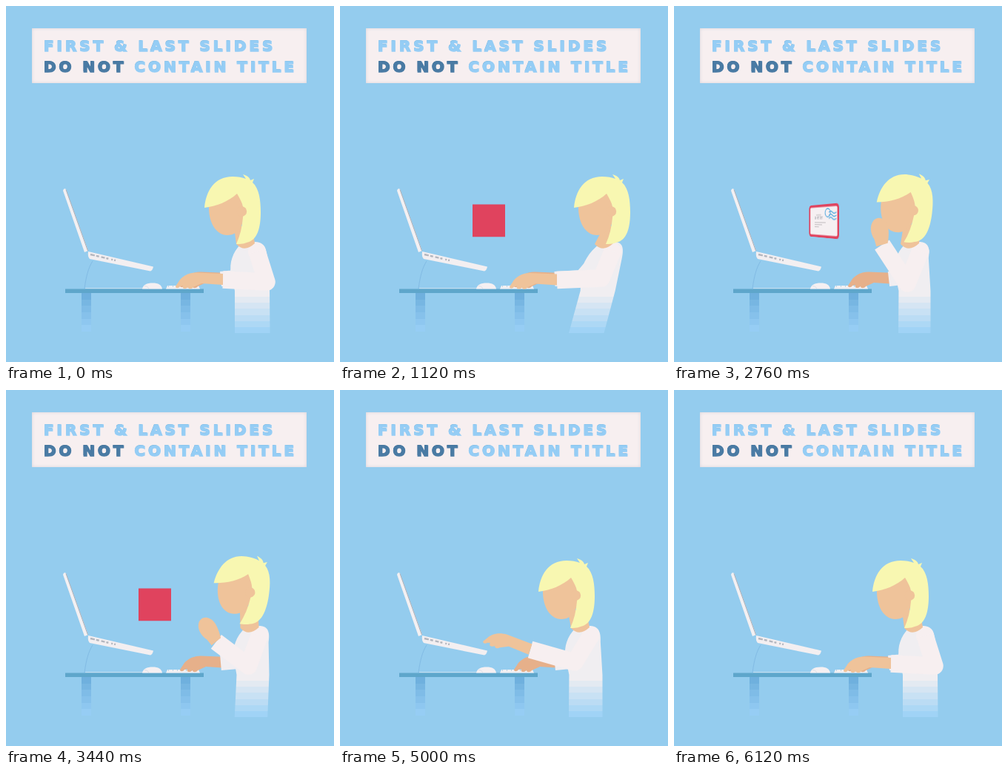
Write an HTML page that moves like this. It is 443 px wide and 480 px high and loops after 6160 ms.

```html
<!DOCTYPE html>
<html lang="en">
<head>
<meta charset="utf-8">
<title>Letter at the desk</title>
<style>
  html, body { margin: 0; width: 100%; height: 100%; overflow: hidden; background: #94ccee; }
  #stage { position: absolute; left: 0; top: 0; width: 443px; height: 480px; overflow: hidden; background: #94ccee; }
  #stage > * { position: absolute; }
  .panel { left: 35px; top: 30px; width: 371px; height: 74px; background: #f7eff0; box-shadow: inset 0 0 4px #d6d2da; }
  .title {
    left: 51px; top: 40px; margin: 0; white-space: nowrap;
    font: bold 20px/28px "DejaVu Sans", sans-serif; letter-spacing: 3.95px;
    color: #95cdf5; -webkit-text-stroke: 1.5px #95cdf5; text-shadow: -.6px -.6px 0 #70b0da;
  }
  .title b { color: #4a7ba4; -webkit-text-stroke-color: #4a7ba4; text-shadow: -.6px -.6px 0 #376890; }
  svg { left: 0; top: 0; }
  #letter { left: 0; top: 0; width: 0; height: 0; perspective: 310px; }
  #card { position: absolute; transform-style: preserve-3d; }
  #card > * { position: absolute; backface-visibility: hidden; }
  .front { left: -22px; top: -22px; width: 44px; height: 44px; background: #e0435e; }
  .back { left: -33px; top: -22px; transform: rotateY(180deg); }
</style>
</head>
<body>
<div id="stage">
  <div class="panel"></div>
  <h1 class="title">FIRST &amp; LAST SLIDES<br><b>DO NOT</b> CONTAIN TITLE</h1>

  <svg width="443" height="480" viewBox="0 0 443 480">
    <defs>
      <linearGradient id="shirt" gradientUnits="userSpaceOnUse" x1="0" y1="384" x2="0" y2="441"></linearGradient>
      <linearGradient id="leg" gradientUnits="userSpaceOnUse" x1="0" y1="387" x2="0" y2="439"></linearGradient>
    </defs>

    <!-- laptop -->
    <path d="M117 344C111 353 108 366 106 381" fill="none" stroke="#82bbe4"/>
    <path d="M107 380.5H186" stroke="#c5def0"/>
    <path d="M77 249Q78 245 81 247L111 330L106 332Z" fill="#f3f0f2"/>
    <path d="M81 247.5L110.5 330" stroke="#a9aeb7"/>
    <path d="M111 331L199 351.5Q198 356.500 195 357.500L113 341Q110 338 111 331Z" fill="#f3eff1"/>
    <path d="M114 335L150 343.5" stroke="#b4b7bf" stroke-width="2.4" stroke-dasharray="6 2 4 3 5 2 3 4 2 2 2 3"/>

    <!-- desk -->
    <path d="M102 387h13v52h-13zM236 387h13v52h-13z" fill="url(#leg)"/>
    <path d="M80 381.5H267V387H80z" fill="#5ea6cb"/>
    <path d="M184 381.5C185 376 190 373.500 198 373.500C206 373.500 210 376 211 381.5Z" fill="#f5f0f2"/>
    <path d="M193 381Q191 377 187 377.5" fill="none" stroke="#d6dce5" stroke-width=".8"/>
    <path d="M216 381.5L218 377H260L262 381.5Z" fill="#f2f0f3"/>
    <path d="M219 378H260" stroke="#b9d5e6" stroke-width="2" stroke-dasharray="1 5"/>

    <!-- woman -->
    <path id="farHand" transform="translate(299 368) scale(-1 1)" fill="#e6b08a"/>
    <polyline id="farSleeve" fill="none" stroke="#f1eef1" stroke-width="20" stroke-linejoin="round"/>
    <path id="torso" fill="url(#shirt)"/>
    <circle id="shoulder" r="12" cy="331" fill="#f7eff0"/>
    <polyline id="sleeve" fill="none" stroke="#f7eff0" stroke-width="23.500" stroke-linejoin="round"/>
    <path id="neck" fill="#efc39a"/>
    <g id="head">
      <path d="M274 268C273 291 283 309 299 309C313 309 322 296 322 276L314 248L290 250Z" fill="#efc39a"/>
      <path id="hair" fill="#f8f7b1"/>
      <circle cx="318.500" cy="277" r="6.700" fill="#efc39a"/>
    </g>
    <path id="hand" fill="#efc39a"/>
  </svg>

  <div id="letter">
    <div id="card">
      <div class="front"></div>
      <svg class="back" width="66" height="45" viewBox="0 0 66 45">
        <rect x="1.700" y="1.700" width="62.600" height="41.600" rx="3.500" fill="#f6f0f2" stroke="#e0435e" stroke-width="3.400"/>
        <text x="14" y="20" font-family="Inter, sans-serif" font-size="5.800" fill="#8b8f96">a letter</text>
        <path d="M18 14h11M14 24.500h25M14 27.500h17M14 30.500h10" stroke="#b9b5b7" stroke-width=".9"/>
        <g fill="none" stroke="#55aade" stroke-width="1.300">
          <circle cx="43.500" cy="11.500" r="5.500"/>
          <path d="M46 11q4-3 7 0t8 0M46 15q4-3 7 0t8 0M46 19q4-3 7 0t8 0"/>
        </g>
      </svg>
    </div>
  </div>
</div>

<script>
const LOOP = 6160;
const $ = id => document.getElementById(id);
const set = (id, name, value) => $(id).setAttribute(name, value);

// Hands point left from the cuff; x runs outward along the forearm.
const HANDS = {
  type: "M0 -8L36 -9.500C48 -9.500 57 -3 60 3L64 9C64 12 60 12 58 9L54 8C56 13 50 13 47 10C47 13 42 13 40 10L29 5L0 7Z",
  fist: "M0 -8C8 -12 22 -17 29 -13C37 -10 38 -2 34 3C29 9 20 11 10 8L0 8Z",
  point: "M0 -8L32 -9C40 -11 46 -14 50 -18L57 -26C61 -29 66 -26 63 -22L58 -11L62 -6L84 -3C89 -2 89 4 84 4L70 4C74 9 70 13 65 10C62 14 57 13 54 9L40 8L0 8Z"
};

// head x, y, turn; lean, hip, waist; elbow x, y; wrist x, y; hand turn
const POSES = {
  rest:   { hand: "type",  v: [0, 0, 0, 0, 0, 0, 352, 372, 293, 369, 0] },
  back:   { hand: "type",  v: [48, 0, 0, 33, 0, 0, 353, 367, 293, 369.5, 0] },
  think:  { hand: "fist",  v: [-2, -3, 7, -3, -4, -4, 314, 375, 281, 323, 64] },
  ponder: { hand: "fist",  v: [2, -2, 7, -5, -6, -4, 315, 374, 281, 322, 74] },
  ready:  { hand: "fist",  v: [8, -5, 9, 6, 0, -3, 328, 372, 284, 340, 50] },
  point:  { hand: "point", v: [3, -7, 9, 3, 0, -2, 318, 364, 254, 346, 17] },
  reach:  { hand: "type",  v: [0, 0, 0, 1, 0, -2, 317, 367, 257, 350, 18] }
};
const ACTING = [
  [0, "rest"], [320, "rest"], [900, "back"], [1160, "back"], [1600, "think"], [2100, "think"],
  [2680, "ponder"], [3040, "ponder"], [3500, "ready"], [3720, "point"], [3900, "point"],
  [4120, "reach"], [5000, "reach"], [5280, "rest"], [LOOP, "rest"]
];

// time, x, y, size, turn
const FLIGHT = [
  [360, 94, 289, 0, 0], [880, 201, 289.5, 1, 0], [1300, 201, 289.5, 1, 0], [1800, 201, 289.5, 1, 180],
  [2625, 201, 289.5, 1, 180], [3000, 201, 289.5, 1, 0], [3540, 201, 289.5, 1, 0], [3780, 94, 289, 0, 0]
];

const mix = (a, b, k) => a + (b - a) * k;
const ease = k => (1 - Math.cos(Math.PI * k)) / 2;

function span(rows, t) {
  let i = 0;
  while (i < rows.length - 2 && t >= rows[i + 1][0]) i++;
  const [a, b] = [rows[i], rows[i + 1]];
  const k = Math.min(1, Math.max(0, (t - a[0]) / (b[0] - a[0])));
  return [a, b, ease(k)];
}

function bands(id, from, to, n) {
  let out = "";
  for (let i = 0; i < n; i++) {
    const c = from.map((v, j) => Math.round(mix(v, to[j], i / (n - 1))));
    for (const edge of [i, i + 1]) out += `<stop offset="${edge / n}" stop-color="rgb(${c})"/>`;
  }
  $(id).innerHTML = out;
}

function drawWoman(t) {
  const [a, b, k] = span(ACTING, t);
  const [from, to] = [POSES[a[1]], POSES[b[1]]];
  const [hx, hy, turn, lean, hip, waist, ex, ey, wx, wy, angle] = from.v.map((v, i) => mix(v, to.v[i], k));
  const p = (x, y) => `${x + mix(hip, lean, (441 - y) / 120)} ${y} `;

  set("torso", "d", `M${p(316, 322)}C${p(307, 332)}${p(301, 345)}${p(304, 362)}L${p(309, 384)}${p(309, 441)}` +
    `${p(356.5 + waist, 441)}${p(356 + waist, 384)}${p(353 + waist, 340)}C${p(352, 322)}${p(345, 318)}${p(336, 318)}Z`);
  set("farSleeve", "points", p(322, 338) + `${310 + lean * .5} 366 290 368`);
  set("neck", "d", `M${308 + hx} ${298 + hy}L${311 + lean} 321Q${322 + lean} 333 ${336 + lean} 320L${332 + hx} ${295 + hy}Z`);
  set("head", "transform", `translate(${hx} ${hy}) rotate(${turn} 315 300)`);

  // the fringe bounces after the flick
  const s = (t - 4120) / 600;
  const flop = s > 0 && s < 1 ? 4 * Math.sin(s * Math.PI * 3) * (1 - s) : 0;
  set("hair", "d", `M268 ${272 + flop}C270 ${250 + flop / 2} 281 230 306 230C313 230 319 231 324 233L320 227` +
    "C326 229 329 231 330 235L335 233L333 238C342 246 344 262 344 278C344 298 340 316 325 319C320 321 315 321 311 321" +
    `C316 310 319 298 320 285C323 270 317 262 312 253C300 264 284 ${270 + flop} 268 ${272 + flop}Z`);

  const sx = 339 + lean * .88 + waist * .5;
  set("shoulder", "cx", sx);
  set("sleeve", "points", `${sx} 331 ${ex} ${ey} ${wx} ${wy}`);
  set("hand", "d", HANDS[(k < .5 ? from : to).hand]);
  set("hand", "transform", `translate(${wx} ${wy}) rotate(${angle}) scale(-1 1)`);
}

function drawLetter(t) {
  const [a, b, k] = span(FLIGHT, t);
  const [, x, y, size, turn] = a.map((v, i) => mix(v, b[i], k));
  $("letter").style.visibility = size > .01 ? "visible" : "hidden";
  $("letter").style.transform = `translate(${x}px, ${y}px) scale(${size})`;
  $("card").style.transform = `rotateY(${turn}deg)`;
}

function draw() {
  const t = performance.now() % LOOP;
  drawWoman(t);
  drawLetter(t);
  requestAnimationFrame(draw);
}

bands("shirt", [240, 238, 241], [160, 211, 246], 7);
bands("leg", [111, 176, 222], [150, 205, 244], 6);
set("farHand", "d", HANDS.type);
draw();
</script>
</body>
</html>
```
